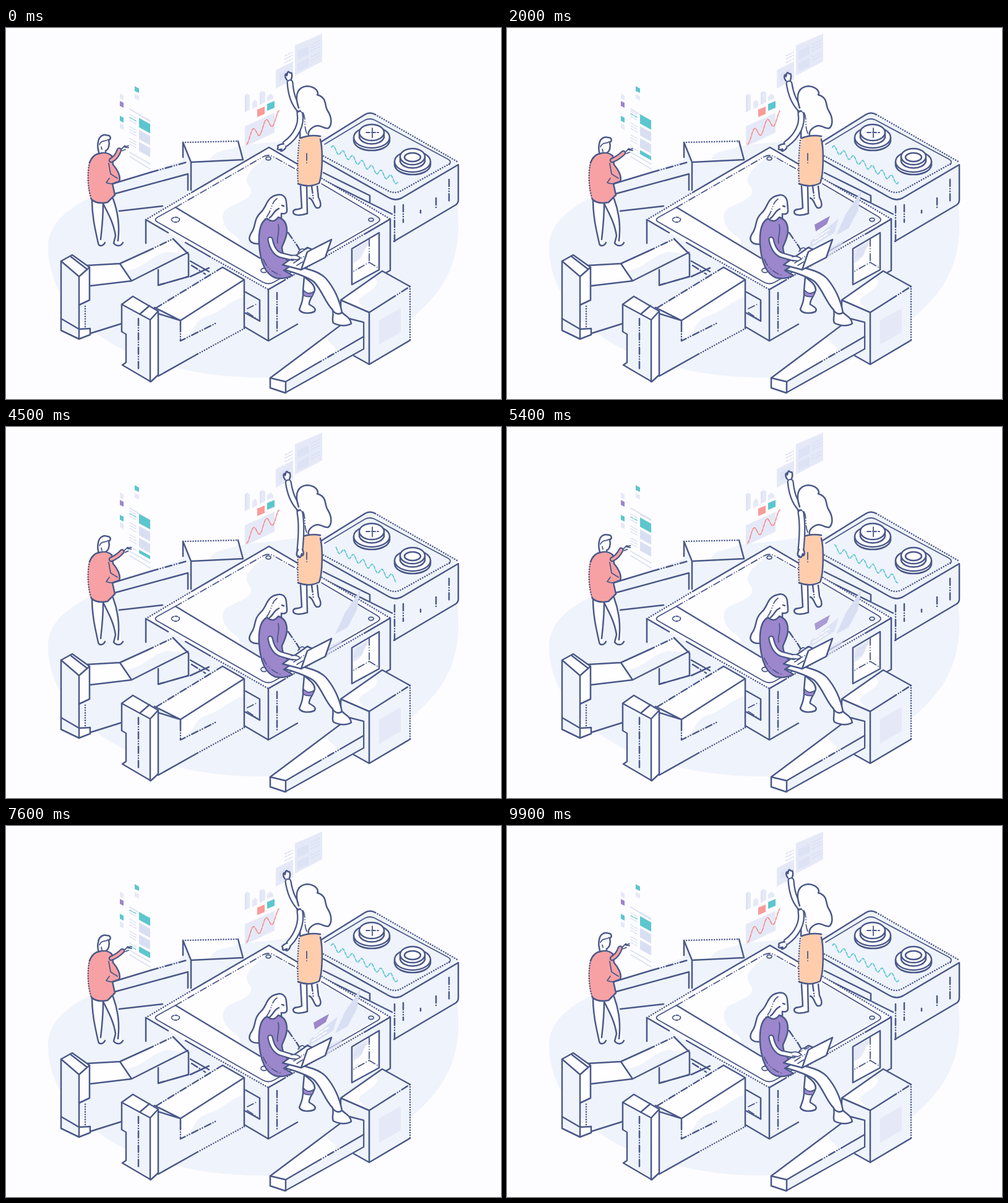
Write an HTML page that moves like this. It is 800x600 px and loops after 10 s.

```html
<!DOCTYPE html>
<html lang="en">
<head>
<meta charset="utf-8">
<style>
html, body { margin: 0; width: 100%; height: 100%; overflow: hidden; background: #fdfcff }
svg { display: block; width: 800px; height: 600px }
path, ellipse, circle { fill: none; stroke-linecap: round; stroke-linejoin: round }
.l { stroke: #4a5888; stroke-width: 2.5 }
.d { stroke-dasharray: .1 4 }
.m { stroke-dasharray: 11 4 .1 4 .1 4 }
.n { stroke-width: 1.8 }
.w { fill: #fefdff }
.t { fill: #eff3fb }
.p { fill: #e5e9f7 }
.q { fill: #d9dff3 }
.teal { fill: #5cc6cf }
.red { fill: #f99b98 }
.coat { fill: #f7a1a4 }
.purple { fill: #9c86cc }
.skirt { fill: #ffcdac }
.thin { stroke: #d9dff2; stroke-width: 1.5 }
</style>
</head>
<body>
<svg viewBox="0 0 800 600">
<defs><clipPath id="list"><path d="M-20 139H20V204H-20Z"/></clipPath></defs>

<!-- floor -->
<path class="t" d="M68 355C68 305 120 277 200 248C265 218 330 193 430 185C520 172 620 160 680 195C716 217 731 260 731 320C731 400 690 440 650 475C590 530 510 565 415 565C330 565 270 552 200 525C120 490 68 425 68 355Z"/>

<!-- rear arm -->
<path class="t" d="M172 252L286 219V185L375 183L383 213L299 262L183 296Z"/>
<path class="w" d="M286 185L375 183L383 213L299 217Z"/>
<path class="t" d="M330 214C335 196 360 200 378 190L383 213Z"/>
<path class="l" d="M299 262V217L286 185V209M375 183L383 213L299 217M176 268L294 236V262M183 296L253 288M172 252L235 233"/>
<path class="l d" d="M286 185L375 183"/>
<path class="l m" d="M235 233L292 217"/>

<!-- control unit -->
<path class="t" d="M505 190L580 140Q588 135 597 140L727 214Q731 217 731 222V278Q731 283 727 286L627 345L512 270Z"/>
<path class="l" d="M508 185L580 140Q588 135 597 140M731 222V278Q731 283 727 286L627 345M513 215L618 274Q630 281 641 274L731 221M513 234L588 271V283L513 246M590 284L624 301"/>
<path class="l d" d="M597 140L731 217M513 207L617 263Q628 269 639 263L718 219"/>
<path class="l n" d="M515 188L580 149Q588 145 596 149L714 212Q721 216 716 221"/>
<path class="l m" d="M628 288V345M716 245V280M695 275V292M642 286V314"/>
<path class="l" d="M670 295V299"/>
<g id="knob">
  <path class="l w" d="M562 177V183C566 203 616 203 620 183V177"/>
  <ellipse class="l w" cx="591" cy="177" rx="29" ry="17"/>
  <path class="l w" d="M571 169V177C576 191 606 191 611 177V169"/>
  <ellipse class="l w" cx="591" cy="169" rx="20" ry="13"/>
</g>
<use href="#knob" x="66" y="39"/>
<path class="l n" stroke-dasharray="6 3" d="M582 169H602M592 162V177"/>
<ellipse class="l w" cx="657" cy="209" rx="13" ry="7"/>
<path id="wave" stroke="#5cc6d6" stroke-width="1.8" stroke-dasharray="5 2.5"/>

<!-- platform -->
<path class="t" d="M226 310L425 193L621 309V392L424 506L226 392Z"/>
<path class="w" d="M226 310L425 193L621 309L424 423Z"/>
<path class="t" d="M424 206L604 309L430 409L385 378C366 362 388 352 372 337C352 325 344 305 356 293C372 282 400 278 396 260C384 246 384 236 424 206Z"/>
<path class="w" d="M274 290L410 372L440 398L424 412L246 310Z"/>
<path class="l" d="M226 310V348M424 423V506M621 309V392L603 402M385 483L424 506L471 479M300 266L425 193L500 237M274 290L410 372M226 310L262 331M290 347L330 370M621 309L580 333M424 423L450 408"/>
<path class="l d" d="M226 310L300 266M500 237L621 309M330 370L424 423L621 309"/>
<path class="l n" d="M274 290L245 306Q238 310 245 314L415 411Q424 416 433 411L600 315Q608 310 600 305L510 252"/>
<path class="l n m" d="M274 290L416 208Q424 204 432 208L510 252"/>
<path class="l m" d="M438 428V492"/>
<g class="l n">
  <ellipse cx="274" cy="310" rx="6.5" ry="4" stroke-dasharray="4 2"/>
  <ellipse cx="424" cy="211" rx="4" ry="2.7"/>
  <ellipse cx="590" cy="310" rx="4" ry="2.7"/>
  <ellipse cx="417" cy="392" rx="5" ry="3.5"/>
</g>
<path class="l w" d="M559 357L603 331V391L559 415Z"/>
<path class="p" d="M561 358L586 344V350C574 362 580 372 561 380Z"/>
<path class="l n m" d="M587 342V379L559 395M587 379L602 388"/>

<!-- left claw -->
<path class="w" d="M131 384L184 381L270 341L296 366V402L246 416V391L203 409L136 417Z"/>
<path class="t" d="M190 393C225 390 225 372 260 362L296 366V402L246 416V391L203 409Z"/>
<path class="l" d="M131 384L184 381L203 409L294 363M136 417L203 409M184 381L228 361M270 341L295 366V402L246 416V391M136 494L187 478M298 377L328 394M298 402L328 388"/>
<path class="l m" d="M228 361L270 341M300 384L322 398M246 416L295 402"/>
<path class="l w" d="M89 377L107 367L135 387V440L118 448V487L136 486V496L118 503L89 489Z"/>
<path class="t" d="M91 381L116 403V499L91 487Z"/>
<path class="l" d="M89 377L118 402V448M118 402L135 387M105 370L131 390M118 487L89 470M118 487V503"/>
<path class="l d" d="M128 450V484"/>

<!-- front claw -->
<path class="t" d="M246 462L350 387L385 407V486L246 563Z"/>
<path class="w" d="M242 454L350 387L385 407L282 473Z"/>
<path class="w" d="M283 474L385 408V434C355 446 350 458 327 465C300 474 310 490 283 505Z"/>
<path class="l" d="M240 452L282 473L385 407V486M350 387L385 407M246 563L310 527M282 473V480M246 462L282 473"/>
<path class="l m" d="M242 453L350 387M282 480V506L340 477"/>
<path class="l d" d="M310 527L385 486"/>
<path class="l w" d="M187 447L205 434L246 458V561L234 572L188 545L194 541V495L187 491Z"/>
<path class="t" d="M189 450L231 474V568L196 546V495L189 491Z"/>
<path class="l" d="M187 447L233 472V572M233 472L246 458M216 463L232 449"/>
<path class="l m" d="M214 470V554"/>
<path class="l" d="M387 427L410 440V474L387 461"/>
<path class="l n m" d="M390 454L406 446M390 460L408 472"/>

<!-- cube and spike -->
<path class="t" d="M541 440L608 393L653 418V505L587 544L541 518Z"/>
<path class="w" d="M541 440L594 403C612 416 582 428 572 437C566 444 578 450 587 460Z"/>
<path class="p" d="M603 473L638 453V492L603 512Z"/>
<path class="l" d="M541 463V440L608 393L653 418M587 460V544L653 505M541 440L587 460L620 439M587 544L562 530"/>
<path class="l m" d="M620 439L653 418"/>
<path class="l d" d="M653 418V505"/>
<path class="l w" d="M427 566L555 470L578 476V519L451 590L427 582Z"/>
<path class="t" d="M452 573L577 499V518L452 588ZM520 498L555 472L577 477V498L530 524C540 512 515 512 520 498Z"/>
<path class="l" d="M427 566L452 572V590M452 572L500 544M540 521L578 499"/>
<path class="l m" d="M500 544L540 521"/>

<!-- floating charts -->
<path class="p" d="M467 28L511 9V54L467 77ZM436 68L464 54V83L436 98ZM386 159L434 137V169L386 192Z"/>
<path class="q" d="M471 37L489 29V43L471 51ZM471 57L489 48V62L471 70ZM442 74L458 66V78L442 86Z" opacity=".65"/>
<path class="thin" stroke-dasharray="4 2" d="M451 45L463 39M451 50L463 44M451 56L463 50M493 27L507 20M493 32L507 25M493 37L507 30M493 47L507 40M493 52L507 45"/>
<path class="p" d="M386 109L390 106L394 109V132L386 136ZM398 121L402 116L406 119V127L398 131ZM410 105L414 102L419 104V120L410 124ZM422 111L427 106L432 110V114L422 118Z"/>
<path class="q" d="M386 109L389 108V135L386 136ZM410 105L413 104V123L410 124Z" opacity=".6"/>
<path class="red" d="M406 132L418 127V139L406 144Z"/>
<path class="teal" d="M422 123L434 118V129L422 134Z"/>
<path id="graph" stroke="#f58c8c" stroke-width="1.7" stroke-dasharray="6 2"/>
<path class="teal" d="M208 94L215 98V105L208 102ZM184 142L190 145V153L184 150Z"/>
<path class="purple" d="M184 118L190 121V129L184 126Z"/>
<path class="p" d="M184 106L190 109V117L184 114ZM208 107L215 110V117L208 114ZM184 154L190 157V165L184 162Z"/>
<path class="thin" d="M200 131L233 151M200 201L233 220M200 208L233 228"/>
<g transform="matrix(1 .55 0 1 215 0)"><g clip-path="url(#list)"><g id="rows"></g></g></g>

<!-- man -->
<path class="w" d="M139 276C136 300 143 325 148 350H155L158 284L175 318L177 350H187C183 325 181 295 174 275Z"/>
<path class="l" d="M139 278C139 305 144 325 149 348C150 354 157 353 160 347M157 283C157 305 155 325 153 342M157 284C164 298 174 315 177 336L174 348C179 354 186 353 189 347M173 276C180 295 184 320 181 344"/>
<g id="manHead">
  <path class="l w" d="M150 201C149 196 147 191 149 184C150 175 157 171 163 173C170 173 170 179 166 181C168 188 166 196 161 198V204"/>
  <path class="l n" d="M151 188C155 180 160 184 165 180M154 192L155 196"/>
</g>
<path class="coat" d="M151 203C139 205 133 216 132 234C132 254 133 266 137 276C146 285 159 283 164 282L176 270L172 252L183 248C186 240 180 229 173 221L171 207C166 202 158 201 151 203Z"/>
<path class="l" d="M138 277C146 285 159 283 164 282L176 270L172 252L183 248C186 240 180 229 173 221L171 207C166 202 158 201 151 203C143 204 138 210 135 218"/>
<path class="l d" d="M135 218C131 235 132 260 138 277"/>
<path class="l n" d="M166 219L169 236L180 243M183 248C176 252 168 253 162 250L167 243"/>
<g id="manArm"></g>

<!-- standing woman -->
<path class="w" d="M474 252L478 293L464 298L486 303L490 280V254L498 287L510 287L505 250ZM472 128L500 135L508 176L474 180Z"/>
<path class="l" d="M476 256L478 291C472 295 466 291 464 297C464 305 478 303 487 300L486 256M503 256L505 274C510 284 510 292 502 291C497 288 497 277 490 275M470 133C474 150 476 160 475 178"/>
<path class="l m" d="M494 256L497 278"/>
<path class="skirt" d="M476 178Q492 172 508 175C512 195 512 236 506 251Q490 259 472 252Q470 215 476 178Z"/>
<path class="l" d="M476 178Q492 172 508 175M508 180C512 195 512 236 506 251Q490 259 472 252"/>
<path class="l d" d="M474 182Q470 215 472 252"/>
<path class="l m n" d="M486 203V222"/>
<g id="lowArm"></g>
<g id="highArm"></g>
<path class="w" d="M471 119C465 101 478 92 490 95C503 96 506 106 505 110C520 114 515 126 520 134C526 145 526 157 521 162C512 165 508 153 497 160C488 164 486 170 488 174C480 160 486 145 480 137C473 133 474 125 471 119Z"/>
<path class="l" d="M473 129C465 106 473 95 487 94C501 95 506 104 503 108C520 113 514 126 520 134C528 147 526 158 521 162C513 164 508 154 497 160C490 164 488 169 489 174"/>
<path class="l m n" d="M480 137C486 148 480 160 487 172"/>

<!-- laptop projections -->
<g id="low">
  <path class="q" d="M488 357L491 345L536 308L529 331Z" opacity=".9"/>
  <path class="purple" d="M497 318L522 304L517 317L499 329Z"/>
  <path stroke="#fff" stroke-width="2" stroke-dasharray="7 3" d="M498 341L522 325M495 348L520 332"/>
</g>
<g id="tall">
  <path class="q" d="M532 335L548 300L573 263L567 296L552 324Z"/>
  <path class="q" d="M513 375L518 357L546 342L538 356ZM561 374L566 358L582 350L575 369Z" opacity=".7"/>
</g>

<!-- seated woman -->
<path class="l w" d="M482 402C487 408 499 413 499 424C496 434 489 440 490 447C499 452 502 455 498 459C488 463 476 461 474 455C478 445 481 437 480 425Z"/>
<path class="l n purple" d="M481 424Q489 433 498 426L495 434Q487 436 480 432Z"/>
<path class="l w" d="M450 391C464 395 486 402 497 410C510 422 515 443 528 456C530 466 526 472 529 477C540 483 552 482 558 478C557 469 549 466 543 460C539 440 530 420 517 405C506 393 485 389 462 383Z"/>
<path class="l" d="M528 457Q536 466 543 460"/>
<g id="girlHead">
  <path class="w" d="M440 269C420 270 420 288 412 298C399 310 405 321 396 332C388 346 406 354 410 340C420 324 424 310 442 306L452 300L456 282Z"/>
  <path class="l" d="M453 281C452 271 445 268 438 270C420 274 422 289 412 298C399 310 405 321 396 332C388 346 400 349 407 349M453 281L454 293C455 300 450 301 445 300V307M446 287L449 288M441 292C432 296 433 302 426 307"/>
  <path class="l m n" d="M438 276C428 282 430 296 420 307C413 315 415 322 412 330"/>
</g>
<path class="l purple" d="M422 308Q432 317 440 306C450 309 454 316 454 328C454 338 449 347 446 354C446 367 454 376 461 384L449 392L463 400Q451 407 435 404C419 398 411 378 409 350C408 330 411 313 422 308Z"/>
<path class="l n" d="M440 318C443 332 437 338 439 348"/>
<path class="l m n" d="M416 374C420 386 430 395 444 400"/>
<path class="l m" d="M456 331C466 346 472 352 477 364"/>
<path class="l w" d="M447 383L487 355L516 367L477 391Z"/>
<path class="l m n" d="M465 380L490 364M470 384L494 369"/>
<g id="typing"></g>
<path class="l w" d="M477 391L487 362L526 342L516 371Z"/>
</svg>

<script>
const $ = id => document.getElementById(id);
const LOOP = 10;

// Eased value from [time, value] pairs
function key(t, pairs) {
  let i = 1;
  while (i < pairs.length - 1 && t > pairs[i][0]) i++;
  const [t0, a] = pairs[i - 1], [t1, b] = pairs[i];
  const u = Math.min(1, (t - t0) / (t1 - t0));
  return a + (b - a) * (1 - Math.cos(Math.PI * u)) / 2;
}

// Reach: 0 = hand low and out, 1 = hand raised and drawn in
const reach = [[0, .3], [1, .85], [2, 0], [2.6, .05], [3.5, 1], [4.5, .03], [5.3, .2], [6.3, .65], [7.6, 0], [8.8, .9], [9.9, .3], [10, .3]];
const scroll = [[0, 158], [1, 180], [2, 210], [2.6, 207], [3.5, 224], [4.5, 269], [5.3, 274], [6.3, 296], [7.6, 323], [8.8, 312], [9.9, 332], [10, 332]];
const swing = [[0, 0], [2, 0], [3.5, .5], [4.5, 1], [6.3, 1], [7.6, .25], [9, 0], [10, 0]];
const lowFade = [[0, 0], [.6, 0], [1.3, 1], [3.6, 1], [4.3, 0], [4.9, 0], [5.6, 1], [8.6, 1], [9.5, 0], [10, 0]];
const tallFade = [[0, 0], [1.1, 0], [1.8, 1], [2.6, 1], [3.4, 0], [3.7, 0], [4.3, 1], [8.2, 1], [9.2, 0], [10, 0]];

const tube = (d, fill, width) =>
  `<path class="l" d="${d}" style="stroke-width:${width + 4.6}"/>` +
  `<path d="${d}" stroke="${fill}" stroke-width="${width}"/>`;

const hand = (x, y, turn) =>
  `<path class="l w" transform="translate(${x} ${y}) rotate(${turn})" d="M-4 6C-7 1 -6 -4 -3 -4V-1L-1 -6Q1 -8 2 -5L5 -4Q6 1 3 6"/>`;

function curve(n, f) {
  let d = '';
  for (let i = 0; i <= n; i++) {
    const [x, y] = f(i / n);
    d += (i ? 'L' : 'M') + x.toFixed(1) + ' ' + y.toFixed(1);
  }
  return d;
}

let rows = '';
for (let i = -1; i < 6; i++) {
  const y = i * 19.3, on = i % 3 === 0;
  rows += `<path class="${on ? 'teal' : 'q'}" d="M0 ${y}h18v15h-18z"/>`;
  for (let j = 0; j < 3; j++)
    rows += `<path d="M-15 ${y + 3 + j * 4.5}h11" stroke="${on && j === 1 ? '#5cc6cf' : '#d9dff2'}" stroke-width="1.5" stroke-dasharray="4 2"/>`;
}
$('rows').innerHTML = rows;

function draw(now) {
  const t = Math.floor(now / 100) / 10 % LOOP;
  const r = key(t, reach), s = key(t, swing);
  const move = (id, x, y) => $(id).setAttribute('transform', `translate(${x} ${y})`);

  move('rows', 0, (key(t, scroll) - 158) % 57.9 + 145.5 - 57.9);
  move('manHead', 0, 4 - Math.min(1, r * 3) * 4);
  move('girlHead', 0, 1 - Math.cos(t * Math.PI * 1.2));

  // Man's pointing arm
  const mx = 193 - 17 * r, my = 200 - 15 * r;
  $('manArm').innerHTML = tube(`M170 214Q${180 - 4 * r} ${210 - 2 * r} ${mx - 5} ${my + 2}`, '#f7a1a4', 4) +
    `<path class="l w n" d="M${mx - 1} ${my}l5 -5l2 1l4 -1M${mx + 4} ${my - 3}l6 1M${mx} ${my + 3}l5 -2"/>`;

  // Standing woman's arms
  const hx = 453 + 10 * r, hy = 79 - 5 * r;
  $('highArm').innerHTML = tube(`M473 130Q${460 + 3 * r} 116 ${hx + 3} ${hy + 11}`, '#fefdff', 6.5) + hand(hx + 1, hy, -8);
  const ax = 445 + 30 * s, ay = 193 + 11 * s;
  $('lowArm').innerHTML = tube(`M475 139C478 155 ${470 + 7 * s} ${174 + 4 * s} ${ax + 7 * (1 - s)} ${ay - 6}`, '#fefdff', 6.5) +
    hand(ax, ay, 240 - 60 * s);

  // Typing hands
  const tap = 3 * Math.sin(t * Math.PI * 2.4);
  $('typing').innerHTML = tube(`M427 342Q431 362 443 367L463 ${372 + tap / 2}`, '#fefdff', 5) +
    `<path class="l w n" d="M461 ${368 + tap}q9 -2 15 4l-6 3l-9 -1M472 ${363 - tap}q6 -9 10 -4l6 -3"/>`;

  $('low').style.opacity = key(t, lowFade);
  $('tall').style.opacity = key(t, tallFade);

  // Signal and chart lines
  const drift = key(t, [[0, 0], [2, -1], [4.5, 6], [6.3, 0], [7.6, -1], [10, 0]]);
  const trim = Math.max(0, drift) / 110;
  $('wave').setAttribute('d', curve(90, u => {
    const v = trim + u * (1 - 2 * trim);
    return [526 + 108 * v + drift / 4, 194 + 55 * v - 5 * Math.sin(v * 44 + .2)];
  }));
  const lift = Math.sin(t * Math.PI * .8) * .15;
  $('graph').setAttribute('d', curve(40, u =>
    [389 + 52 * u, 179 - 36 * u + 9 * Math.cos(u * 15.7 + lift)]));

  requestAnimationFrame(draw);
}
draw(performance.now());
</script>
</body>
</html>
```
